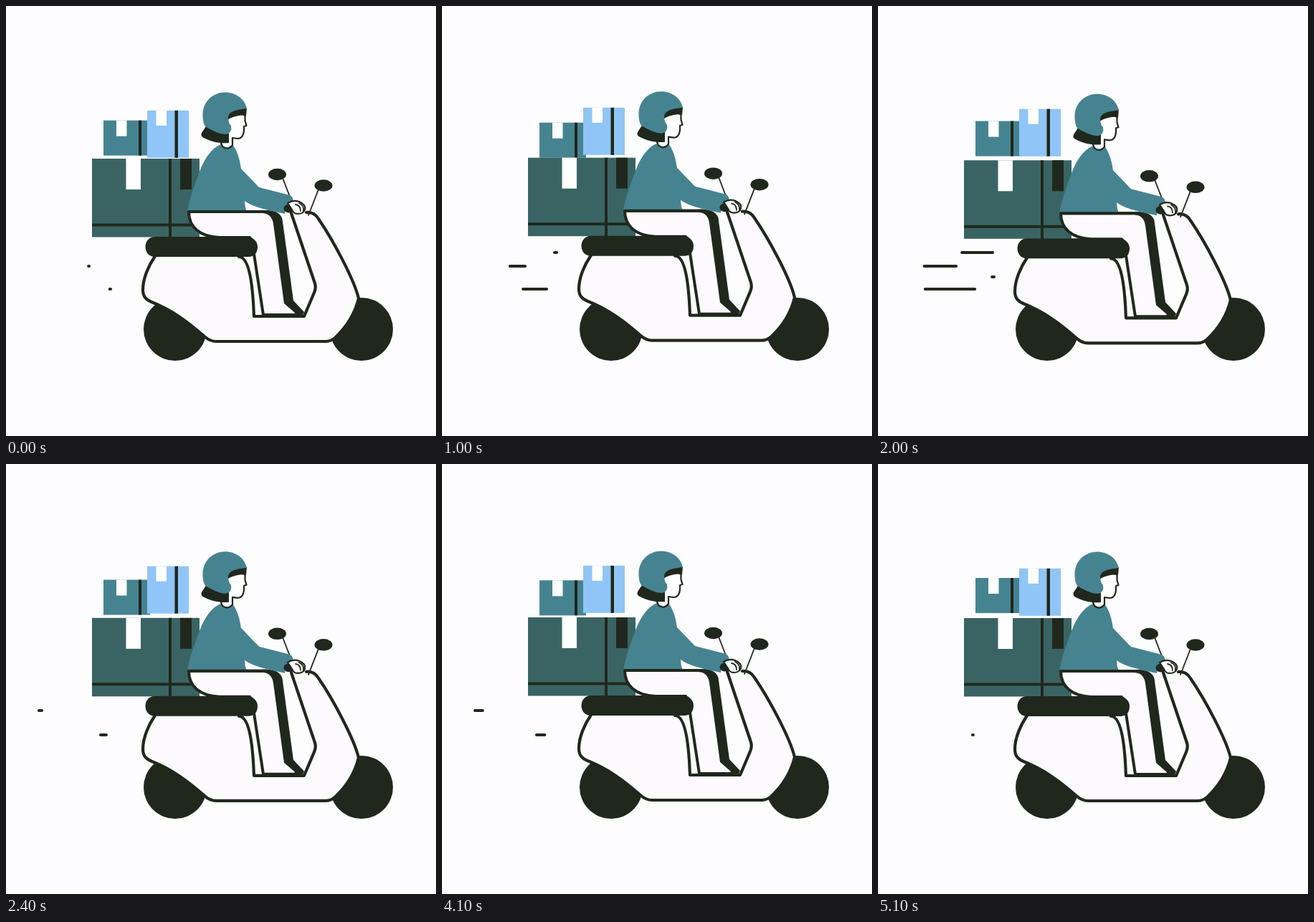
Write an HTML page with a canvas that moves like this. It is 600 px wide and 600 px high and loops after 5200 ms.

```html
<!DOCTYPE html>
<html lang="en">
<head>
<meta charset="utf-8">
<title>Scooter delivery</title>
<style>
  html, body { margin: 0; width: 100%; height: 100%; overflow: hidden; background: #fdfcfe; }
  canvas { display: block; width: 600px; height: 600px; }
</style>
</head>
<body>
<canvas id="stage" width="600" height="600"></canvas>
<script>
const ctx = document.getElementById('stage').getContext('2d');
const PAPER = '#fdfcfe', PALE = '#fcfafd', WHITE = '#ffffff', INK = '#20281d';
const TEAL = '#468391', PINE = '#3a6463', SKY = '#90c5f7';

const LOOP = 5200, STEP = 100;
const TICKS_PER_MS = 0.03;
const BOUNCE = 13;          // ticks per bounce
const STREAK = 26;          // ticks per cycle of the speed lines
const STROKE_TIME = 12.6;   // ticks one end of a speed line travels
const TAIL_DELAY = 6.2;

// Height of the scooter over one bounce, one key per tick
const BOB = [0, -1.2, -1.9, -2, -1.3, 0, 1, 1.8, 2.3, 2.4, 2, 1.4, 0.7];

const STREAKS = [
  { y: 363, from: 116, to: 52, start: -0.9 },
  { y: 395, from: 146, to: 46, start: -0.9 },
  { y: 344, from: 160, to: 46, start: 2.7 },
  { y: 378, from: 162, to: 132, start: 5.5 }
];

const BODY_SIDE = 'M208 349 C199 362 191 380 191 396 C191 406 196 410 203 413 C231 424 253 440 278 462 ' +
  'Q285 468 293 468 H446 Q453 468 459 463 C473 450 486 433 492 408 C486 382 456 326 436 297 Q430 287 419 288 ';
const BODY_WELL = '398 289 L431 387 Q433 393 430 400 L416 433 H346 C345 405 342 350 325 350';

const shape = {
  body: new Path2D(BODY_SIDE + 'L' + BODY_WELL + ' Z'),
  bodyLine: new Path2D(BODY_SIDE + 'M' + BODY_WELL),
  seat: new Path2D('M208 322 H341 C346 325 351 329 351 336 C351 345 346 350 338 350 H208 C190 350 190 322 208 322 Z'),
  leg: new Path2D('M255 287 H362 Q378 287 380 302 L395 413 L412 432 H359 L345 346 L343 323 H298 C270 323 255 308 255 287 Z'),
  legLine: new Path2D('M340 323 H298 C270 322 255 308 255 287 H364 M346 346 L359 431 H410'),
  legStripe: new Path2D('M358 285 H366 Q382 286 385.5 297 L401 411 L416 427 L413 434 L402 431 L403 428 L388 415 L373 304 Q371 290 358 289 Z'),
  torso: new Path2D('M300 193 C287 198 278 212 272 226 C264 247 256 268 253 287 H336 Q333 280 333 272 ' +
    'C342 279 360 284 389 290 Q389 280 401 275 Q401 266 396 264 L353 253 L328 227 Q325 205 316 193 Q308 202 300 193 Z'),
  hair: new Path2D('M281 165 L273 177 Q271 182 276 184 C288 190 298 192 311 191 L314 172 Z'),
  face: new Path2D('M311 152 L333 149 L334 160 L335.5 167 L332 168 Q333 185 323 185 L316 184 V194 Q310 202 302 196 L300 192 H311 Z'),
  faceLine: new Path2D('M333.5 151 V160 L335.5 167 L332 168 Q333 185 323 185 L316 184 V194 Q310 202 302 196 L300 191'),
  fringe: new Path2D('M308 160 L310 146 L336 142 L335 153.5 L329 152.5 Q320 153 312 157 Z'),
  helmet: new Path2D('M336 143 C333 129 320 120.5 306 120.5 C288 120.5 274.5 134 274.5 152 Q274.5 163 278 168 ' +
    'C288 174 298 179 307 179 Q316 177 314 167 Q310 163 310 155 C311 147 320 145 336 143 Z'),
  hand: new Path2D('M393 275 Q401 270 409 273 Q419 277 417 284 Q415 290 407 290 Q401 290 399 284 Z'),
  fingers: new Path2D('M404 277 Q411 278 411 286 M409 275 Q416 278 415 286')
};

function fill(path, color) {
  ctx.fillStyle = color;
  ctx.fill(path);
}

function stroke(path, width) {
  ctx.lineWidth = width;
  ctx.strokeStyle = INK;
  ctx.stroke(path);
}

function rect(x, y, w, h, color) {
  ctx.fillStyle = color;
  ctx.fillRect(x, y, w, h);
}

function oval(x, y, rx, ry) {
  ctx.fillStyle = INK;
  ctx.beginPath();
  ctx.ellipse(x, y, rx, ry, 0, 0, Math.PI * 2);
  ctx.fill();
}

function line(x1, y1, x2, y2, width) {
  const path = new Path2D();
  path.moveTo(x1, y1);
  path.lineTo(x2, y2);
  stroke(path, width);
}

function ease(ticks) {
  const p = Math.min(1, Math.max(0, ticks / STROKE_TIME));
  return (1 - Math.cos(Math.PI * p)) / 2;
}

function drawStreak({ y, from, to, start }, tick) {
  const age = (tick - start + STREAK) % STREAK;
  if (age >= STROKE_TIME + TAIL_DELAY) return;
  const at = ticks => from + (to - from) * ease(ticks);
  line(at(age), y, at(age - TAIL_DELAY), y, 4.2);
}

function drawSmallBoxes(tick) {
  const sway = peak => Math.cos(2 * Math.PI * (tick - peak) / BOUNCE);
  const left = 160.8 + 2 * sway(4.5);
  rect(136, left, 65, 49, TEAL);
  rect(154, left, 14.5, 22, WHITE);
  rect(185, left, 4, 49, INK);
  const right = 144 - 2.4 * sway(5);
  rect(197, right, 58, 66, SKY);
  rect(209.5, right, 14.5, 21, WHITE);
  rect(235.5, right, 4.5, 66, INK);
}

function drawBigBox() {
  rect(120, 213, 150, 109.5, PINE);
  rect(167.5, 213, 20.5, 43, WHITE);
  rect(243, 213, 16, 43, INK);
  rect(227, 213, 4, 109.5, INK);
  rect(120, 303.5, 150, 4, INK);
}

function drawScooter() {
  fill(shape.body, PALE);
  stroke(shape.bodyLine, 4.2);
  line(386, 240, 396, 266, 1.8);
  line(436, 256, 422, 292, 1.8);
  oval(378.5, 235, 12.5, 8.3);
  oval(443, 250.5, 12.5, 8.3);
}

function drawRider() {
  fill(shape.leg, PALE);
  stroke(shape.legLine, 4);
  fill(shape.legStripe, INK);
  fill(shape.seat, INK);
  fill(shape.torso, TEAL);
  line(255, 287, 364, 287, 4);

  fill(shape.hair, INK);
  fill(shape.face, WHITE);
  stroke(shape.faceLine, 2.2);
  fill(shape.fringe, INK);
  fill(shape.helmet, TEAL);

  oval(394.5, 282.5, 7, 6);
  fill(shape.hand, WHITE);
  stroke(shape.hand, 2.2);
  stroke(shape.fingers, 1.8);
}

function draw(now) {
  const time = Math.floor((now % LOOP) / STEP) * STEP;
  const tick = Math.round(time * TICKS_PER_MS);
  rect(0, 0, 600, 600, PAPER);
  ctx.lineCap = ctx.lineJoin = 'round';

  for (const streak of STREAKS) drawStreak(streak, tick);
  oval(236, 451, 44, 44);
  oval(496, 451, 44, 44);
  drawSmallBoxes(tick);

  ctx.save();
  ctx.translate(0, BOB[tick % BOUNCE]);
  drawBigBox();
  drawScooter();
  drawRider();
  ctx.restore();
}

const begin = performance.now();
function frame() {
  draw(performance.now() - begin);
  requestAnimationFrame(frame);
}
frame();
</script>
</body>
</html>
```
